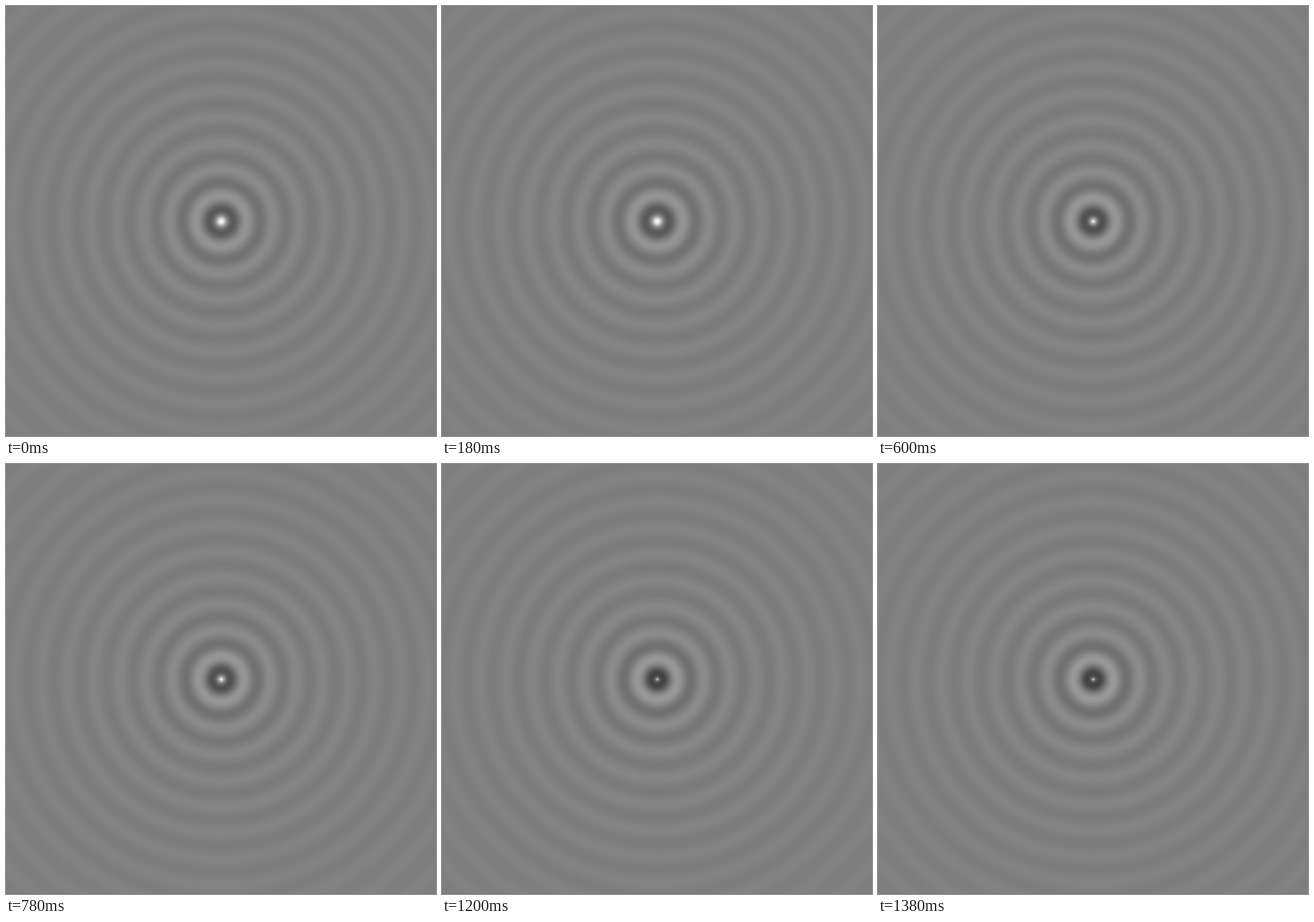
Animation of 748 by 748 pixels, one loop 1.5 s. Source, as an HTML page with a canvas:

```html
<!DOCTYPE html>
<html lang="en">
<head>
<meta charset="utf-8">
<title>Circular wave</title>
<style>
  html, body { margin: 0; width: 100%; height: 100%; overflow: hidden; background: #808080; }
  canvas { display: block; }
</style>
</head>
<body>
<canvas id="stage" width="748" height="748"></canvas>
<script>
const ctx = document.getElementById("stage").getContext("2d");
const CELL = 4, N = 189, MID = 94;      // coarse sampling grid, scaled up smoothly
const OFFSET = 374.5 - (MID + 0.5) * CELL;
const WAVELENGTH = 45.45;
const STEP_MS = 300, STEPS = 5;
const PHASE_STEP = 1.1 * Math.PI;
const STRENGTH = 1000, SOFTEN = 4;
const K = 2 * Math.PI / WAVELENGTH;

function makeWave(phase) {
  const grid = document.createElement("canvas");
  grid.width = grid.height = N;
  const g = grid.getContext("2d");
  const img = g.createImageData(N, N);
  for (let y = 0, i = 0; y < N; y++) {
    for (let x = 0; x < N; x++, i += 4) {
      const r = CELL * Math.hypot(x - MID, y - MID);
      const v = 128 + STRENGTH * Math.cos(K * r + phase) / (r + SOFTEN);
      img.data[i] = img.data[i + 1] = img.data[i + 2] = v;
      img.data[i + 3] = 255;
    }
  }
  g.putImageData(img, 0, 0);
  return grid;
}

const waves = Array.from({ length: STEPS }, (_, n) => makeWave(n * PHASE_STEP));
const start = performance.now();
let shown = -1;

function draw() {
  const t = Math.max(0, performance.now() - start);
  const step = Math.floor(t / STEP_MS) % STEPS;
  if (step !== shown) {
    shown = step;
    ctx.imageSmoothingEnabled = true;
    ctx.imageSmoothingQuality = "low";
    ctx.drawImage(waves[step], OFFSET, OFFSET, N * CELL, N * CELL);
  }
  requestAnimationFrame(draw);
}
draw();
</script>
</body>
</html>
```
